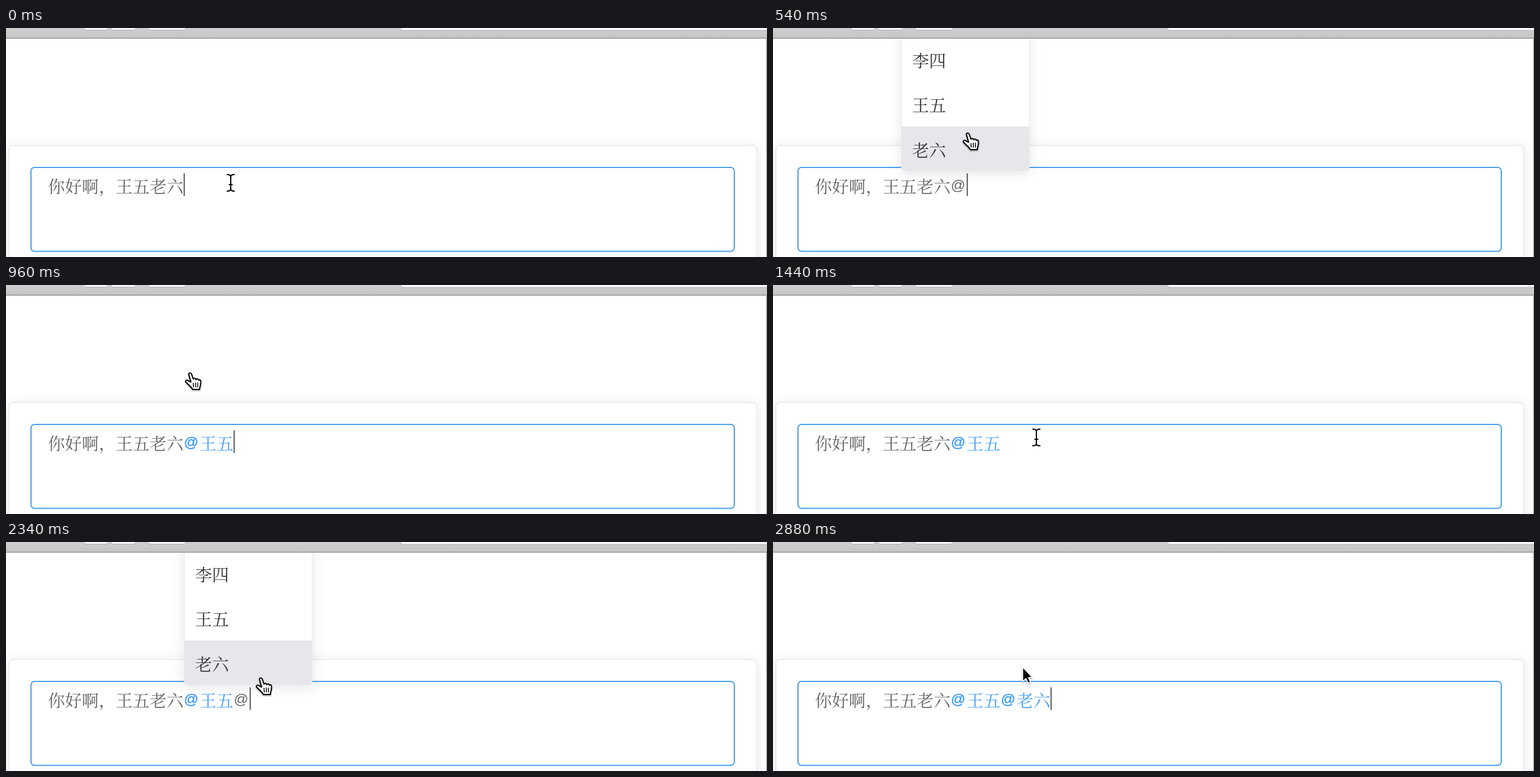
Write an HTML page that moves like this. It is 1280 px wide and 386 px high and loops after 3.06 s.

```html
<!DOCTYPE html>
<html lang="zh-CN">
<head>
<meta charset="utf-8">
<title>Mention input</title>
<style>
  html, body { margin: 0; width: 100%; height: 100%; overflow: hidden; background: #fff; }
  svg { display: block; width: 100vw; height: 100vh; }
  text { font: 28.5px "Noto Serif CJK SC", "Noto Sans CJK SC", "Noto Sans CJK", serif; }
  .at { font: 24px "Liberation Sans", Arial, sans-serif; text-anchor: middle; }
  .plain { fill: #606266; }
  .tag { fill: #409eff; }
  .tag.at { stroke: #409eff; stroke-width: .5; }
  .item { fill: #303133; }
</style>
</head>
<body>
<svg viewBox="0 0 1280 386" preserveAspectRatio="none">
  <defs>
    <linearGradient id="bar" x2="0" y2="1">
      <stop offset="0" stop-color="#cfcfcf"/><stop offset="1" stop-color="#c5c5c5"/>
    </linearGradient>
    <filter id="soft" x="-20%" y="-20%" width="140%" height="140%">
      <feDropShadow dx="0" dy="4" stdDeviation="10" flood-opacity=".1"/>
    </filter>
    <filter id="drop" x="-40%" y="-40%" width="180%" height="180%">
      <feDropShadow dx="0" dy="1.5" stdDeviation="1.2" flood-opacity=".4"/>
    </filter>
    <clipPath id="panel"><rect x="216" y="-60" width="215" height="301" rx="5"/></clipPath>
  </defs>

  <rect width="1280" height="386" fill="#fff"/>
  <rect x="5" y="198" width="1257.5" height="240" rx="6" fill="#fff" stroke="#e6e8ed" stroke-width="1.5" filter="url(#soft)"/>
  <rect x="42" y="235" width="1183" height="141.5" rx="6" fill="#fff" stroke="#4a9ff0" stroke-width="2"/>
  <g id="line"></g>
  <rect id="caret" y="245" width="1.6" height="38" fill="#333"/>

  <g id="popup">
    <rect x="216" y="-60" width="215" height="301" rx="5" fill="#fff" stroke="#e4e7ed" stroke-width="1" filter="url(#soft)"/>
    <rect id="hover" x="216" width="215" height="75" fill="#e6e7eb" clip-path="url(#panel)"/>
    <g id="items"></g>
  </g>

  <rect width="1280" height="17" fill="url(#bar)"/>
  <g fill="#fcfcfc" stroke="#acacac" stroke-width="1">
    <rect x="130" y="-20" width="42.5" height="23.5" rx="5"/>
    <rect x="176" y="-20" width="43" height="23.5" rx="5"/>
    <rect x="238.500" y="-20" width="64.500" height="23.5" rx="5"/>
    <rect x="663" y="-20" width="640" height="24" rx="5"/>
  </g>
  <rect y="16.500" width="1280" height="1.500" fill="#979797"/>
  <rect x="1278.500" y="17" width="1.500" height="369" fill="#a8a8a8"/>

  <g id="pointer" stroke-linecap="round" stroke-linejoin="round">
    <g id="beam" fill="none">
      <path stroke="#fff" stroke-width="4" d="M-6-14Q0-14 0-10Q0-14 6-14M0-10V10M-6 14Q0 14 0 10Q0 14 6 14M-2.500 3H2.500"/>
      <path stroke="#000" stroke-width="2" d="M-6-14Q0-14 0-10Q0-14 6-14M0-10V10M-6 14Q0 14 0 10Q0 14 6 14M-2.500 3H2.500"/>
    </g>
    <g id="hand" stroke="#000" filter="url(#drop)">
      <path fill="#fff" stroke-width="2" d="M-2.500 3C-3.500 0 1-1 2 2L5 10.500C6 8.500 9 8.800 9.500 11.500C11 9.500 13.500 10 14 12.500C15.500 11 17.500 12 17.500 14.500C18 19 17 22 16 25L15.500 28H4C3 25-1 22-3.500 19.500L-7.500 15.500C-9 13-6 11.500-4 13L1 15.500Z"/>
      <path fill="none" stroke-width="1.500" d="M5 17.500L5.500 24M8.800 17L9 24M12.500 17V24"/>
    </g>
    <path id="arrow" fill="#000" stroke="#fff" stroke-width="1.500" filter="url(#drop)" d="M0 0V24L5.500 19L9 27L13 25.300L9.700 17.500L16 17Z"/>
  </g>
</svg>
<script>
const LOOP = 3060, TICK = 60, EM = 28.5, AT = 27, LEFT = 70.5;
const $ = id => document.getElementById(id);
const within = (t, a, b) => t >= a && t < b;
const show = (el, on) => el.setAttribute("visibility", on ? "visible" : "hidden");

function addText(parent, x, y, str, cls) {
  const el = document.createElementNS("http://www.w3.org/2000/svg", "text");
  el.setAttribute("x", x);
  el.setAttribute("y", y);
  el.setAttribute("class", cls);
  el.textContent = str;
  parent.append(el);
  return el;
}

["李四", "王五", "老六"].forEach((name, i) => addText($("items"), 234, 66 + 75.3 * i, name, "item"));

// Each run appears at `from`; mentions turn blue at `tagged`.
let edge = LEFT;
const runs = [
  ["你好啊，王五老六", 0, Infinity],
  ["@", 120, 960], ["王五", 960, 960],
  ["@", 1800, 2700], ["老六", 2700, 2700]
].map(([str, from, tagged]) => {
  const at = str === "@", x = edge;
  edge += at ? AT : EM * str.length;
  const el = addText($("line"), at ? x + 13 : x, at ? 272.5 : 277.5, str, "");
  return { el, at, from, tagged, end: edge };
});

// time, x, y of the pointer's hot spot
const path = [
  [0, 378, 261], [360, 378, 261], [420, 378, 260], [480, 358, 226], [540, 328, 177],
  [600, 312, 152], [900, 311, 149], [960, 310, 148], [1080, 328, 163], [1260, 405, 229],
  [1440, 443, 257], [2100, 443, 257], [2220, 439, 248], [2340, 429, 229],
  [2640, 421, 214], [2880, 420, 211], [LOOP, 420, 211]
];

function pointerAt(t) {
  const i = path.findIndex(p => p[0] > t);
  const [t0, x0, y0] = path[i - 1], [t1, x1, y1] = path[i];
  const k = (t - t0) / (t1 - t0);
  return [x0 + (x1 - x0) * k, y0 + (y1 - y0) * k];
}

function render(time) {
  const t = Math.floor(time / TICK) * TICK;

  let end = LEFT;
  for (const r of runs) {
    const on = t >= r.from;
    show(r.el, on);
    r.el.setAttribute("class", (t >= r.tagged ? "tag" : "plain") + (r.at ? " at" : ""));
    if (on) end = r.end;
  }
  $("caret").setAttribute("x", end + 0.4);
  show($("caret"), !(within(t, 660, 960) || within(t, 1440, 1800) || within(t, 2400, 2700)));

  const first = within(t, 180, 960), second = within(t, 1860, 2700);
  const open = first || second, shift = second ? 84 : 0;
  $("popup").setAttribute("transform", `translate(${shift} 0)`);
  $("popup").setAttribute("display", open ? "inline" : "none");

  const [x, y] = pointerAt(t);
  const over = open && y < 241 && within(x, 216 + shift, 431 + shift);
  $("hover").setAttribute("y", y < 166 ? 91 : 166);
  $("hover").setAttribute("display", over ? "inline" : "none");

  const hand = over || t === 960 || within(t, 2700, 2820);
  const beam = !hand && y >= 235;
  $("pointer").setAttribute("transform", `translate(${x} ${y})`);
  show($("hand"), hand);
  show($("beam"), beam);
  show($("arrow"), !hand && !beam);
}

const start = performance.now();
function loop() {
  render((performance.now() - start) % LOOP);
  requestAnimationFrame(loop);
}
loop();
</script>
</body>
</html>
```
